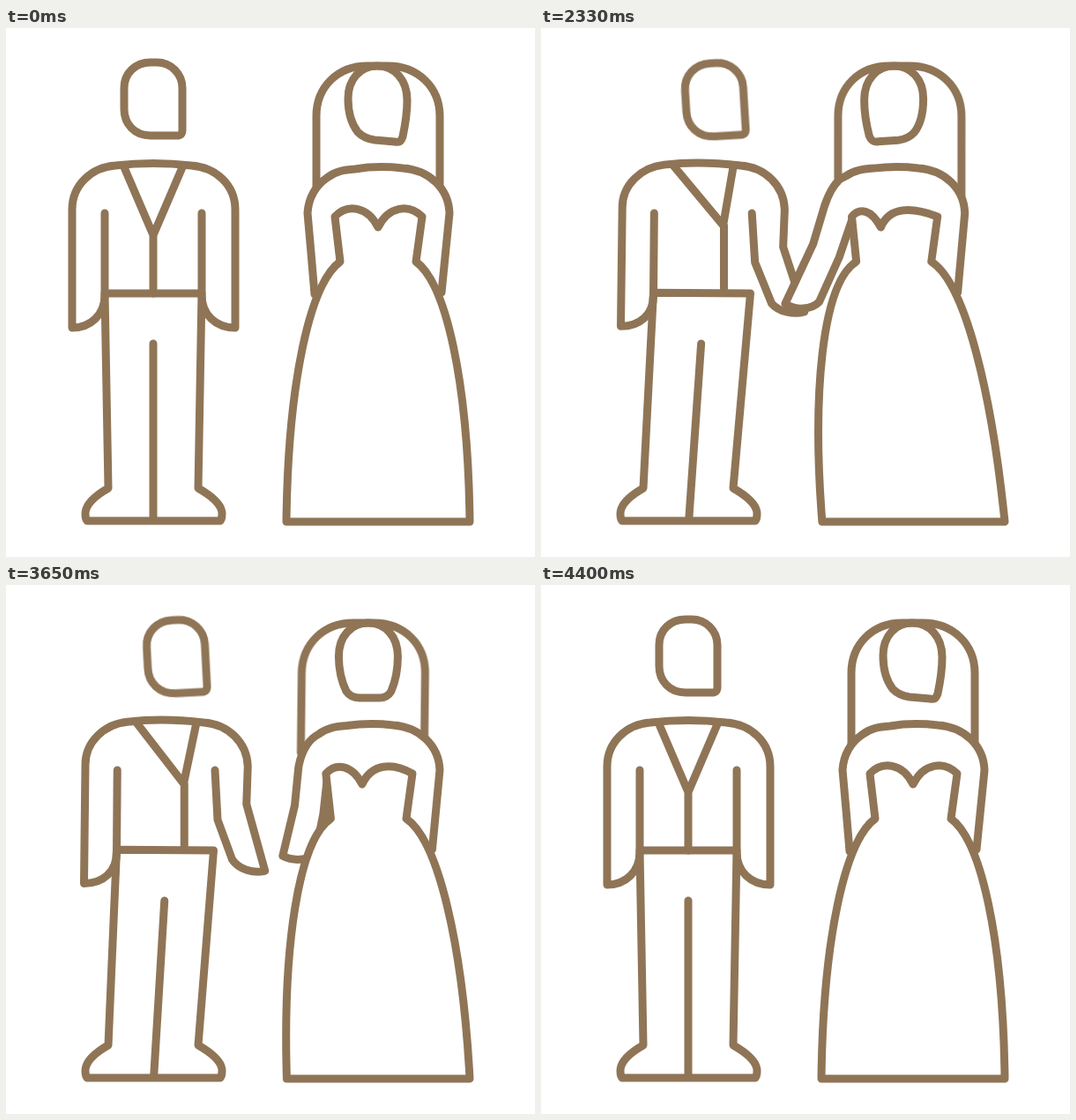
Animation of 600x600 px, one loop 4.43 s. Source, as an HTML page without scripts:

```html
<!DOCTYPE html>
<html lang="en">
<head>
<meta charset="utf-8">
<title>Bride and groom</title>
<style>
  html, body { margin: 0; width: 100%; height: 100%; overflow: hidden; background: #fff; }
  svg { display: block; width: 100%; height: 100%; }

  path {
    fill: none; stroke: #8f7556; stroke-width: 9;
    stroke-linecap: round; stroke-linejoin: round;
  }
  .solid { fill: #fff; }

  /* Each timing curve covers the whole loop: 0 = standing apart, 1 = holding hands. */
  .groom {
    --ease: linear(0, 0 45.2%, .02 45.8%, .1 47.2%, .3 48.9%, .6 50.7%, .86 52.6%, .97 54.5%,
      1.02 56%, 1 58%, .98 62%, .99 77.6%, .97 79.5%, .84 81.7%, .55 84%, .25 86.5%, .02 88.8%,
      -.1 91%, -.14 93.5%, -.12 95%, -.05 97.5%, 0 99.3%, 0);
  }
  .bride {
    --ease: linear(0, 0 45.4%, .02 45.8%, .12 47.2%, .34 48.9%, .65 50.7%, .89 52.6%, .97 54.8%,
      1 58%, .99 64%, .98 74%, .96 77.6%, .85 79.5%, .55 81.7%, .2 84%, -.09 86.5%, -.15 88.5%,
      -.12 91%, -.03 94%, .02 96.5%, 0 99.3%, 0);
  }
  .veil {
    --ease: linear(0, 0 45.3%, .03 45.8%, .06 47%, .16 49%, .35 50.7%, .59 52.6%, .8 54.8%,
      1 58%, 1.04 60%, .97 63%, .84 66.5%, .77 69.5%, .82 74%, .86 77.6%, .83 79.5%, .72 81.7%,
      .5 84%, .25 86.5%, .05 89%, -.1 92%, -.1 94%, -.03 97%, 0 99.3%, 0);
    transform-origin: 0 100px;
    animation: sway 4430ms infinite;
  }

  .morph { d: var(--apart); animation: morph 4430ms var(--ease) infinite; }
  .shift { animation: shift 4430ms var(--ease) infinite; }

  @keyframes morph { from { d: var(--apart); } to { d: var(--together); } }
  @keyframes shift { from { transform: translate(0, 0) rotate(0deg); } to { transform: var(--moved); } }
  @keyframes sway {
    0%, 52.6%, 66%, 80%, 92%, 100% { transform: skewX(0deg); }
    58% { transform: skewX(-3deg); }
    86.5% { transform: skewX(-1deg); }
  }
</style>
</head>
<body>
<svg viewBox="0 0 600 600">
  <g class="veil">
    <path class="shift" style="--moved: translate(-25.5px, 0) rotate(0deg)"
      d="M352 190V100C352 67 376 43 410 43H433C467 43 492 67 492 100V190"/>
  </g>

  <g class="groom">
    <!-- head -->
    <path class="shift" style="--moved: translate(35px, 1px) rotate(-4deg); transform-origin: 167px 81px"
      d="M164 39H171C187 39 200 52 200 68V116Q200 122 194 122H164C146 122 134 109 134 92V68C134 51 147 39 164 39Z"/>
    <!-- trousers and shoes -->
    <path class="morph" style="
      --apart: path('M222 301L112 301L116 522C102 530 90 540 90 551C90 555 91 558 92 559L243 559C244 558 245 555 245 551C245 540 232 530 218 522L222 301M167 358L167 556');
      --together: path('M240 301L130 300L116 522C102 530 90 540 90 551C90 555 91 558 92 559L243 559C244 558 245 555 245 551C245 540 232 530 218 522L240 301M184 358L168 556')"/>
    <!-- jacket and arms -->
    <path class="morph" style="
      --apart: path('M112 210L112 303C112 325 96 340 75 340L75 206C75 178 97 158 124 156C150 153 184 153 210 156C238 158 260 178 260 206L260 250L260 340C238 340 222 325 222 303L222 270L222 210');
      --together: path('M131 210L130 303C130 325 115 338 93 338L95 203C95 178 116 158 142 155C168 152 203 153 229 156C256 158 278 178 279 206L277 248L305 319C295 323 278 322 268 314L246 265L242 210')"/>
    <!-- lapels -->
    <path class="morph" style="
      --apart: path('M134 158L167 235L200 158M167 235L167 301');
      --together: path('M153 156L213 222L221 157M214 222L214 300')"/>
  </g>

  <g class="bride">
    <!-- shoulders and arms -->
    <path class="morph solid" style="
      --apart: path('M376 218L381 260L385 300C375 306 360 306 350 302L346 255L342 210C343 192 352 178 364 170C374 162 384 161 396 160C414 157 432 157 450 159C480 161 502 182 503 210L494 300');
      --together: path('M350 217L333 260L307 312C298 322 280 322 268 314L304 244L319 201C326 182 333 171 343 168C353 161 363 160 375 159C393 157 409 157 425 159C455 161 477 182 478 210L470 300')"/>
    <!-- dress -->
    <path class="morph solid" style="
      --apart: path('M373 214C387 199 410 202 422 226C434 202 457 199 472 214L465 265C499 290 524 400 526 560L318 560C320 400 345 290 379 265Z');
      --together: path('M350 214C358 204 370 206 381 226C390 203 415 203 447 214L440 265C480 290 510 420 526 560L319 560C306 420 315 290 355 265Z')"/>
    <!-- head -->
    <path class="morph" style="
      --apart: path('M421 43C440 43 455 58 455 82C455 97 453 109 450 123C448 129 446 130 441 129L418 127C410 126 404 123 399 118C392 109 388 95 388 80C388 58 402 43 421 43Z');
      --together: path('M398 43C417 43 431 58 431 80C431 95 428 109 420 118C415 123 409 126 401 127L378 129C373 130 371 129 369 123C366 109 364 97 364 82C364 58 379 43 398 43Z')"/>
  </g>
</svg>
</body>
</html>
```
